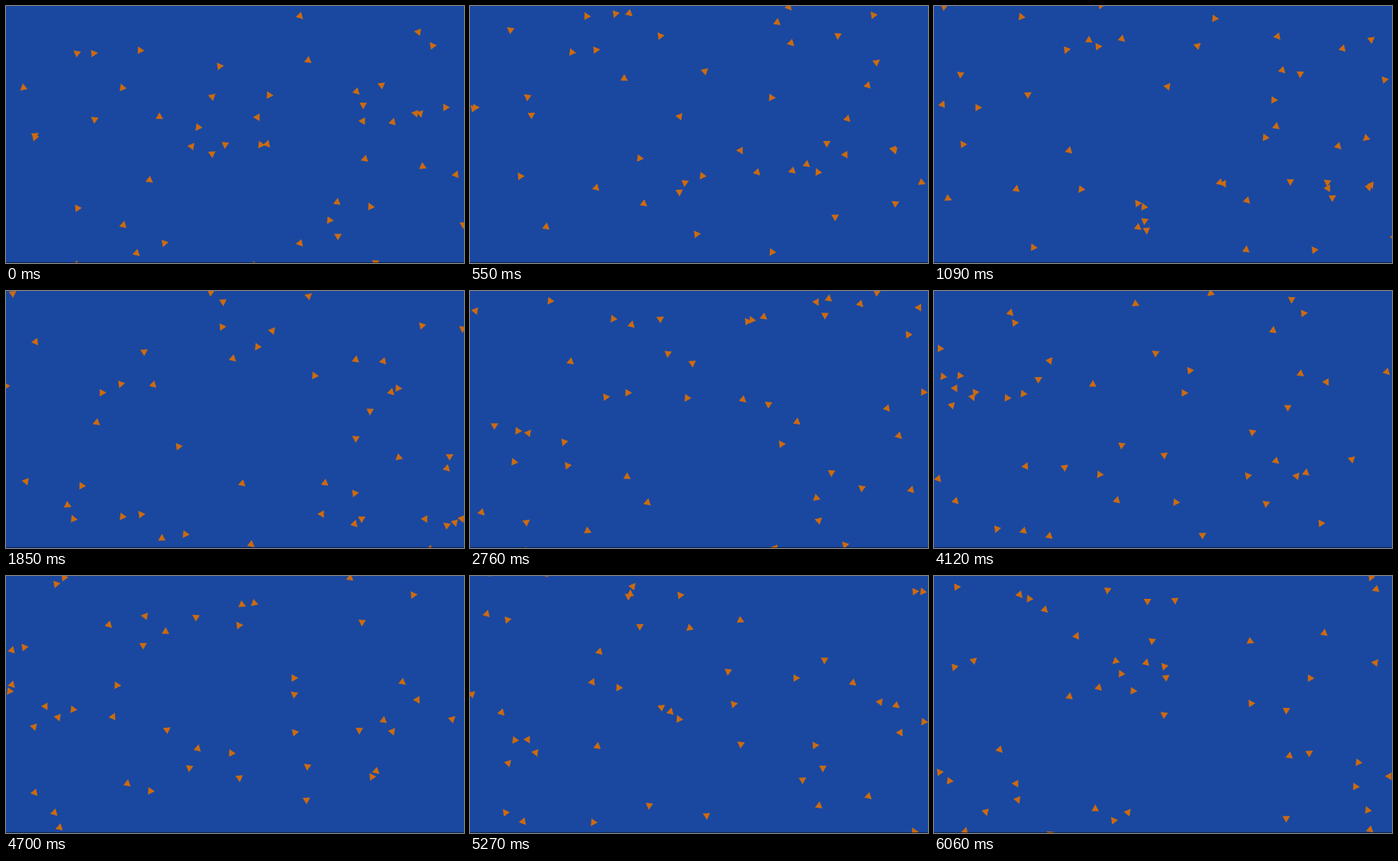
Write an HTML page with a canvas that moves like this. It is 600 px wide and 337 px high and loops after 6.09 s.

```html
<!DOCTYPE html>
<html lang="en">
<head>
<meta charset="utf-8">
<title>Drifting triangles</title>
<style>
  html, body { margin: 0; height: 100%; overflow: hidden; background: #1a48a0; }
  canvas { display: block; }
</style>
</head>
<body>
<canvas id="stage" width="600" height="337"></canvas>
<script>
const ctx = document.getElementById('stage').getContext('2d');
const LOOP = 6090, STEP = 30.3, LAST = 200;
const WRAP_X = 619, WRAP_Y = 348;

// Start x, start y and heading in degrees
const flock = [
  [386, 14, 45], [541, 33, -51.6], [558, 51, -127.1], [92, 61, -142.7],
  [116, 62, -5.1], [175, 57, -116.9], [279, 78, -127.5], [396, 70, -82.5],
  [22, 108, 138.9], [152, 106, -112.3], [271, 118, -41.6], [346, 117, 3.6],
  [460, 113, 45.5], [493, 103, -36.5], [468, 131, 90.7], [577, 133, 0.1],
  [537, 142, 69], [543, 142, 74.4], [507, 151, -73.4], [468, 152, 61.1],
  [330, 147, 60.1], [201, 144, -88.9], [115, 148, -144], [251, 160, 126],
  [39, 169, -32.2], [37, 171, -131.5], [244, 183, -51.3], [270, 195, 85.1],
  [287, 183, 96.4], [333, 183, 125.8], [343, 182, 47.4], [469, 201, 162.1],
  [547, 211, 24.6], [590, 220, -66.2], [189, 229, 38], [93, 264, -123.7],
  [154, 286, -76.6], [434, 256, -81.7], [477, 262, -115.7], [423, 282, 123.9],
  [436, 301, -30.1], [386, 312, 49.8], [172, 325, 41.7], [207, 312, 109.7],
  [598, 286, -146.4], [92, 338, -80.8], [326, 338.5, -126.6], [484, 337.7, 92.4]
];

// Distance travelled after a number of steps; the flock slows a little
const pace = [[0, 0], [36, 100.5], [61, 169], [91, 249.8], [136, 370.8], [174, 470], [200, 536]];

function travelled(step) {
  const i = Math.max(1, pace.findIndex(p => p[0] >= step));
  const [s0, d0] = pace[i - 1], [s1, d1] = pace[i];
  return d0 + (d1 - d0) * (step - s0) / (s1 - s0);
}

// Wrap v into a range of the given size centred on the stage
function wrap(v, size, stage) {
  const low = (stage - size) / 2;
  return ((v - low) % size + size) % size + low;
}

function triangle(x, y, angle) {
  ctx.save();
  ctx.translate(x, y);
  ctx.rotate(angle);
  ctx.beginPath();
  ctx.moveTo(4.6, 0);
  ctx.lineTo(-4.2, 4.9);
  ctx.lineTo(-4.2, -4.9);
  ctx.fill();
  ctx.restore();
}

function draw(now) {
  const step = Math.min(LAST, Math.floor(now % LOOP / STEP + 0.2));
  const d = travelled(step);
  ctx.fillStyle = '#1a48a0';
  ctx.fillRect(0, 0, 600, 337);
  ctx.fillStyle = '#cc6a10';
  for (const [x, y, deg] of flock) {
    const a = deg * Math.PI / 180;
    triangle(wrap(x + d * Math.cos(a), WRAP_X, 600), wrap(y + d * Math.sin(a), WRAP_Y, 337), a);
  }
  ctx.fillStyle = 'rgba(0, 0, 0, .55)';
  ctx.fillRect(0, 336, 600, 1);
}

const start = performance.now();
function tick() {
  draw(performance.now() - start);
  requestAnimationFrame(tick);
}
tick();
</script>
</body>
</html>
```
